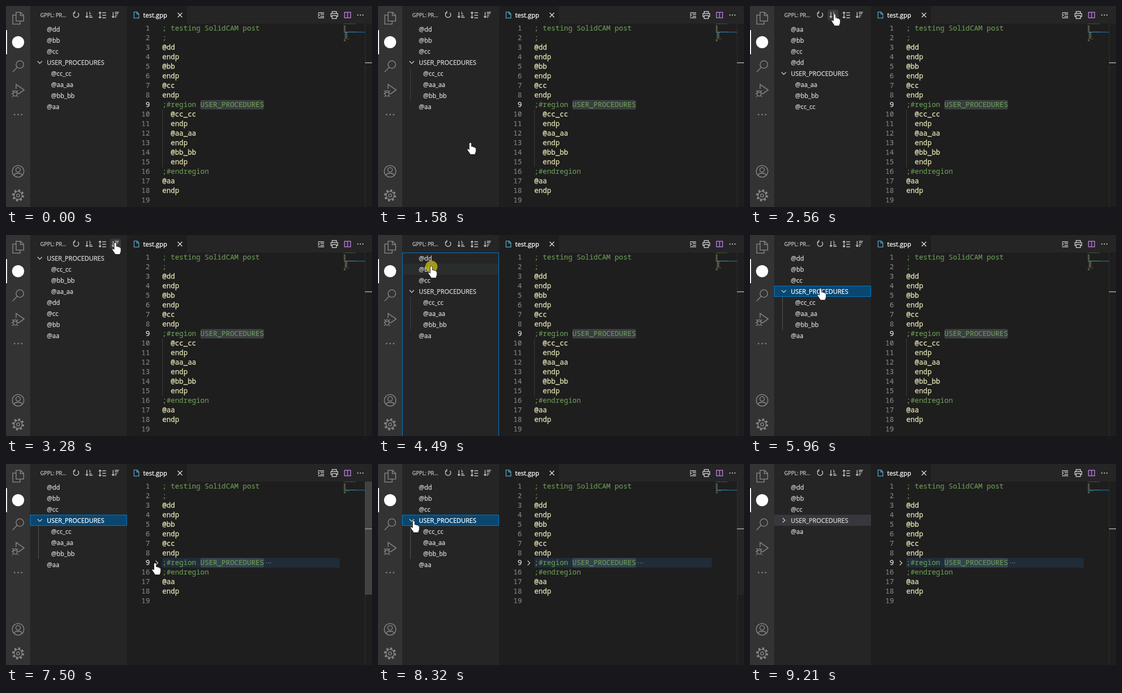
An HTML page that plays this animation: 726x400 px, repeating every 9550 ms.

```html
<!DOCTYPE html>
<html lang="en">
<head>
<meta charset="utf-8">
<title>Procedure tree</title>
<style>
html, body { margin: 0; width: 100%; height: 100%; overflow: hidden; background: #1e1e1e; }
svg { display: block; }
text { fill: currentColor; stroke: currentColor; stroke-width: .3; }
.ui { font-family: "Open Sans", "Noto Sans", sans-serif; font-size: 12.3px; color: #d8d8d8; }
.lit { color: #fff; }
.code { font: 500 14px "Noto Sans Mono", "DejaVu Sans Mono", monospace; color: #e2e0b2; }
.code .rem { color: #6a9955; stroke-width: .15; }
.code .num { color: #858585; text-anchor: end; stroke-width: .15; }
.code .now { color: #e0e0e0; stroke-width: .3; }
.line { fill: none; stroke: #d0d0d0; stroke-width: 1.4; }
.bar { fill: none; stroke: #858585; stroke-width: 1.6; }
</style>
</head>
<body>
<svg width="726" height="400" viewBox="0 0 726 400">
  <rect width="726" height="400" fill="#1e1e1e"/>
  <rect x="240" width="486" height="35" fill="#252526"/>
  <rect x="240" width="119" height="35" fill="#1e1e1e"/>
  <rect x="48" width="192" height="400" fill="#252526"/>
  <rect width="48" height="400" fill="#333"/>
  <rect y="48" width="2" height="48" fill="#fff"/>

  <g class="bar">
    <path d="M20 30V12.500H29L35 18.500V30ZM28.500 12.500V19H35M20 18H13.500V36H28V30"/>
    <circle cx="27.500" cy="116.500" r="7.500"/><path d="M22 122L13 131.500"/>
    <path d="M20 165V156L36 167L25 175"/>
    <ellipse cx="18" cy="174" rx="4" ry="5.500"/>
    <path d="M14 172H22M12 168L15 171M24 168L21 171M11 174.500H14M22 174.500H25M12 181L15 178M24 181L21 178" stroke-width="1.300"/>
    <circle cx="24" cy="329" r="11.500"/><circle cx="24" cy="326" r="4.500"/>
    <path d="M16 337C17 331.500 31 331.500 32 337"/>
    <circle cx="24" cy="377" r="8"/><circle cx="24" cy="377" r="3"/>
    <circle cx="24" cy="377" r="10" stroke-width="4" stroke-dasharray="3.927"/>
  </g>
  <g fill="#858585"><circle cx="17" cy="216" r="1.600"/><circle cx="24" cy="216" r="1.600"/><circle cx="31" cy="216" r="1.600"/></g>
  <circle cx="24" cy="72" r="12" fill="#fff"/>

  <text class="ui" x="68" y="22" style="font-size:10.300px;color:#c4c4c4">GPPL: PR...</text>
  <g id="hover"></g>
  <g class="line">
    <path d="M142.500 13.500A5.300 5.300 0 1 1 136 13.200M136.500 10V13.800H133"/>
    <path d="M160.500 12V23M158 20.500L160.500 23L163 20.500M165 12.500H167M165 15.500H168.500M165 19.500H170M165 22.500H172"/>
    <path d="M186.500 12V24M184 14.500L186.500 12L189 14.500M184 21.500L186.500 24L189 21.500M191 13.500H198.500M191 18.500H198.500M191 23.500H198.500"/>
    <path d="M212.500 12V23M210 20.500L212.500 23L215 20.500M216 12.500H224M216 15.500H222.500M216 19.500H220.500M216 22.500H218.500"/>
    <path d="M340.500 13.500L349.500 22.500M349.500 13.500L340.500 22.500" stroke="#eee"/>
    <path d="M619 13.500H631M624 16.500H631M624 20.500H631M619 23.500H631M619 15.500L621.500 18.200L619 21"/>
    <path d="M647 15V11H655.500V15M647 21H644.500V15H658V21H655.500M647 19H655.500V25H647Z"/>
    <path d="M671.500 12.500H683.500V23.500H671.500ZM677.500 12.500V23.500" stroke="#bd7ee6" stroke-width="1.500"/>
    <path d="M254 12H260L263.500 15.500V24H254ZM259.500 12V16H263.500" stroke="#519aba" stroke-width="1.600"/>
  </g>
  <g fill="#c5c5c5"><circle cx="698" cy="18" r="1.200"/><circle cx="703" cy="18" r="1.200"/><circle cx="708" cy="18" r="1.200"/></g>
  <text class="ui lit" x="272" y="22.500" style="font-size:12.600px">test.gpp</text>

  <g id="tree" class="ui"></g>
  <g id="editor" class="code"></g>
  <rect id="slider" x="712" y="35" width="14" fill="#797979" opacity="0"/>
  <circle id="click" r="12" fill="#c4b410" fill-opacity=".8"/>
  <path id="hand" fill="#fff" stroke="#222" stroke-width="1"
    d="M-2.500 13V1C-2.500 -1.700 2 -1.700 2 1V7C3 5.800 5.300 6.200 5.600 8C6.600 7 8.600 7.500 8.800 9.200C10 8.800 11 9.800 11 11V16C11 18.500 9.500 19 9 22.500H-.5C-1 20 -4 17.500 -6 13.500C-7 11.300 -4.500 10 -2.500 13Z"/>
</svg>
<script>
const LOOP = 9550, STEP = 80, CH = 8.4, ROW = 22, LINE = 19, TOP = 35;
const $ = id => document.getElementById(id);

const REGION = 'USER_PROCEDURES';
const proc = (name, pad = 0) => [[pad, '@' + name], [pad, 'endp']];
const lines = [
  [0, '; testing SolidCAM post'], [0, ';'],
  ...['dd', 'bb', 'cc'].flatMap(n => proc(n)),
  [0, ';#region ' + REGION],
  ...['cc_cc', 'aa_aa', 'bb_bb'].flatMap(n => proc(n, 2)),
  [0, ';#endregion'], ...proc('aa'), [0, '']
];

const orders = {
  file: ['dd', 'bb', 'cc', REGION, 'cc_cc', 'aa_aa', 'bb_bb', 'aa'],
  up: ['aa', 'bb', 'cc', 'dd', REGION, 'aa_aa', 'bb_bb', 'cc_cc'],
  down: [REGION, 'cc_cc', 'bb_bb', 'aa_aa', 'dd', 'cc', 'bb', 'aa'],
  shut: ['dd', 'bb', 'cc', REGION, 'aa']
};

// Timelines: [start, value]
const order = [[0, 'file'], [2390, 'up'], [3200, 'down'], [3850, 'file'], [8560, 'shut']];
const picked = [[0, ''], [4660, 'bb'], [5230, 'cc_cc'], [5880, REGION]];
const jump = [[0, REGION], [4740, 'bb'], [5230, 'cc_cc'], [5960, REGION]];
const guides = [[0, 0], [1340, 1], [2140, 0], [3930, 1], [8560, 0]];

// Pointer moves: [start, steps, x, y]
const moves = [
  [80, 1, 190, 383], [1340, 11, 168, 17], [2640, 6, 217, 16], [3360, 2, 193, 16],
  [3850, 8, 106, 63], [4910, 4, 112, 132], [5480, 5, 140, 107], [6210, 1, 141, 107],
  [6540, 11, 296, 198], [7750, 9, 63, 111], [8640, 1, 66, 116], [8890, 1, 82, 167]
];
const clicks = [[2220, 2390], [3040, 3200], [3520, 3680], [4490, 4660],
  [5150, 5230], [5800, 5960], [7420, 7500], [8400, 8560]];

const at = (table, t) => table.filter(s => s[0] <= t).pop()[1];
const within = (t, [a, b]) => t >= a && t < b;
const ease = k => k * k * (3 - 2 * k);

function pointer(t) {
  let x = 190, y = 405;
  for (const [start, steps, tx, ty] of moves) {
    if (t < start) break;
    const k = ease(Math.min(steps, Math.floor((t - start) / STEP) + 1) / steps);
    x += (tx - x) * k;
    y += (ty - y) * k;
  }
  return { x, y, on: within(t, [80, 8970]) };
}

const rect = (x, y, w, h, fill, more = '') =>
  `<rect x="${x}" y="${y}" width="${w}" height="${h}" fill="${fill}" ${more}/>`;
const text = (x, y, s, cls = '') => `<text x="${x}" y="${y}" class="${cls}">${s}</text>`;
const chevron = (x, y, open) =>
  `<path class="line" d="${open ? `M${x - 4.5} ${y - 2.2}l4.500 4.500l4.500 -4.500` : `M${x - 2.2} ${y - 4.5}l4.500 4.500l-4.500 4.500`}"/>`;

function tree(s) {
  const rows = orders[s.order];
  let out = '';
  rows.forEach((name, i) => {
    const y = TOP + i * ROW, group = name === REGION, nested = name.includes('_') && !group;
    const active = name === s.picked && !s.blur;
    if (active) out += rect(48.5, y + .5, 191, ROW - 1, '#094771', 'stroke="#007fd4"');
    else if (name === s.picked) out += rect(48, y, 192, ROW, '#37373d');
    else if (i === s.over) out += rect(48, y, 192, ROW, '#2a2d2e');
    if (group) out += chevron(67, y + 11, s.order !== 'shut');
    if (nested && s.guides) out += rect(64, y, 1, ROW, s.picked ? '#585858' : '#404040');
    out += text(nested ? 89.5 : 81, y + 15.5, group ? name : '@' + name, active ? 'lit' : '');
  });
  if (s.border) out += rect(48.5, 35.5, 191, 370, 'none', 'stroke="#007fd4"');
  return out;
}

function editor(s) {
  const shown = lines.map(([pad, str], i) => ({ pad, str, n: i + 1 }))
    .filter(l => !s.folded || l.n < 10 || l.n > 15);
  const target = shown.findIndex(l => l.str.endsWith(s.jump));
  let out = '', map = rect(670, TOP + target * 2, 42, 2, '#1f5274');
  shown.forEach(({ pad, str, n }, i) => {
    const y = TOP + i * LINE, x = 310 + pad * CH, rem = str[0] === ';';
    if (i === target || (s.jump === 'bb' && str.includes('bb'))) {
      for (let k = str.indexOf(s.jump); k >= 0; k = str.indexOf(s.jump, k + 1))
        out += rect(x + k * CH, y, s.jump.length * CH, LINE, '#3a3d41', 'rx="3"');
    }
    if (pad) out += rect(310, y, 1, LINE, '#404040');
    if (s.folded && n === 9) out += rect(310, y, 352, LINE, '#264f78', 'opacity=".3"');
    out += text(285.3, y + 14, n, i === target ? 'num now' : 'num') + text(x, y + 14, str, rem ? 'rem' : '');
    if (n === 9 && s.folded) {
      for (const dx of [516, 520.5, 525]) out += rect(dx - .7, y + 9, 1.5, 1.5, '#858585');
    }
    if (n === 9 && (s.folded || s.gutter)) out += chevron(299, y + 10, !s.folded);
    str.split(' ').reduce((px, w) => {
      map += rect(px, TOP + i * 2, w.length, 1, rem ? '#6a9955' : '#dcdcaa', 'opacity=".55"');
      return px + w.length + 1;
    }, 670 + pad);
  });
  const mark = TOP + target * LINE * 365 / ((shown.length - 1) * LINE + 365);
  return out + map + rect(712, TOP, 1, 365, '#303030') + rect(712, Math.round(mark) - 1, 14, 2, '#8f8f8b');
}

const cache = {};
function put(id, view, state) {
  const key = JSON.stringify(state);
  if (cache[id] === key) return;
  cache[id] = key;
  $(id).innerHTML = view(state);
}

function draw(t) {
  const p = pointer(t), inTree = p.on && t >= 1340 && p.y > TOP && p.x >= 48 && p.x < 240;
  const folded = t >= 7500;
  put('tree', tree, {
    order: at(order, t), picked: at(picked, t), guides: at(guides, t), blur: t >= 9210,
    border: within(t, [4490, 4660]), over: inTree ? Math.floor((p.y - TOP) / ROW) : -1
  });
  put('editor', editor, { jump: at(jump, t), folded, gutter: p.x > 240 && p.x < 310 });
  const button = p.on && p.y < TOP ? [139, 165, 191, 217].find(x => Math.abs(x - p.x) < 11) : 0;
  put('hover', x => x ? rect(x - 11, 7, 22, 22, '#383a3b', 'rx="5"') : '', button || 0);

  const slider = $('slider'), fade = within(t, [8000, 8400]) ? 1 - (t - 8000) / 400 : 0;
  slider.setAttribute('height', folded ? 225 : 188.5);
  slider.setAttribute('opacity', .4 * (p.x > 240 ? 1 : fade));

  const place = `translate(${p.x.toFixed(1)} ${p.y.toFixed(1)})`;
  for (const id of ['hand', 'click']) $(id).setAttribute('transform', place);
  $('hand').setAttribute('visibility', p.on ? 'visible' : 'hidden');
  $('click').setAttribute('visibility', clicks.some(c => within(t, c)) ? 'visible' : 'hidden');
}

const begin = performance.now();
function tick() {
  draw((performance.now() - begin) % LOOP);
  requestAnimationFrame(tick);
}
tick();
</script>
</body>
</html>
```
